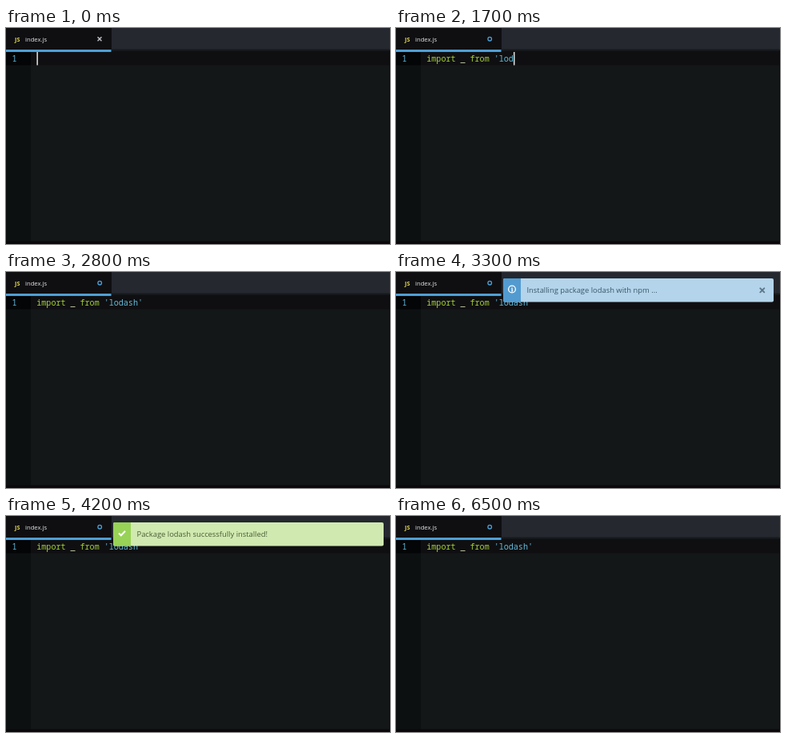
An HTML page for the animation above (6.6 s loop, 480 px wide and 270 px high).

```html
<!DOCTYPE html>
<html lang="en">
<head>
<meta charset="utf-8">
<title>Installing a package from the editor</title>
<style>
  html, body { margin: 0; width: 100%; height: 100%; overflow: hidden; background: #141718; }
  svg { display: block; width: 100vw; height: 100vh; }
  text { font-family: "Open Sans", "Noto Sans", "DejaVu Sans", sans-serif; white-space: pre; }
  .code { font: 500 10.05px "Noto Sans Mono", "DejaVu Sans Mono", monospace; }
  .line { fill: none; stroke-linecap: round; stroke-linejoin: round; }
  .note { transform-box: fill-box; transform-origin: 50% 50%; }
  .note text { font-size: 9.4px; }
  .item { font-size: 7.9px; }
</style>
</head>
<body>
<svg viewBox="0 0 480 270" preserveAspectRatio="none">
  <!-- editor -->
  <rect width="480" height="270" fill="#141718"/>
  <rect y="29" width="31" height="238" fill="#0d1011"/>
  <rect y="29" width="480" height="17.5" fill="#0f0f11"/>
  <rect y="29" width="31" height="17.5" fill="#040506"/>
  <rect y="266.5" width="480" height="3.5" fill="#0b080c"/>
  <rect x="479" y="28" width="1" height="242" fill="#08080a"/>
  <text class="code" x="7.6" y="42" fill="#62b9dc">1</text>
  <text class="code" id="code" x="38.3" y="42"></text>
  <rect id="caret" y="30" width="1.5" height="16.5" fill="#e4e4e4"/>

  <!-- tabs -->
  <rect width="480" height="27" fill="#25282f"/>
  <rect y="26.5" width="480" height="1.5" fill="#17191d"/>
  <rect width="132" height="27" fill="#0f0f12"/>
  <rect y="27" width="131.5" height="3" fill="#4f9fd3"/>
  <text x="11" y="17" font-size="7.2" font-weight="700" fill="#e5d84a">JS</text>
  <text x="24" y="16.5" font-size="7.7" fill="#e6e8ea">index.js</text>
  <path id="close" class="line" d="M115 11.7l4 4m0-4l-4 4" stroke="#b9bcc0" stroke-width="1.6"/>
  <circle id="dirty" cx="117.2" cy="13.7" r="2.3" fill="none" stroke="#4f9fd3" stroke-width="1.3"/>

  <!-- palette -->
  <g id="palette">
    <rect x="52.5" y="-4" width="374.5" height="101" fill="#1c1f20" stroke="#484c4e"/>
    <rect x="60.5" y="8" width="358.5" height="19" rx="1" fill="#595959" stroke="#0b0c0d"/>
    <rect x="65.3" y="9.5" width="1.5" height="16.5" fill="#eee"/>
    <rect x="60" y="36" width="360" height="26" fill="#529bd0"/>
    <rect x="60" y="63" width="360" height="26" fill="#272929"/>
    <g class="line" stroke="#fff" stroke-width="1.1">
      <path d="M68.5 45.8l5-1.6 5 1.6v6l-5 2-5-2zM68.5 45.8l5 1.8 5-1.8M73.5 47.6v6.2M71 45l5 1.8v2"/>
      <path d="M71.4 73l-3 3 3 3M74.6 73l3 3-3 3" stroke="#b4b6b7" stroke-width="1.4"/>
    </g>
    <text class="item" x="83" y="52" fill="#fff">lodash</text>
    <text class="item" x="83" y="79" fill="#8f9293">lodash → dev</text>
  </g>

  <!-- notifications -->
  <g id="info" class="note">
    <rect x="134" y="8" width="338" height="29.5" rx="2" fill="#b3d4ea"/>
    <path d="M156 8h-20a2 2 0 0 0-2 2v25.500a2 2 0 0 0 2 2h20z" fill="#529bd0"/>
    <circle cx="145" cy="21.500" r="4.400" fill="none" stroke="#fff" stroke-width="1.300"/>
    <path d="M144.200 20.900h1v3m-1 0h2M145 18.800v.7" fill="none" stroke="#fff" stroke-width="1.100"/>
    <text x="163.500" y="26.300" fill="#3a566b">Installing package lodash with npm ...</text>
    <path class="line" d="M455.300 20.300l5 5m0-5l-5 5" stroke="#5d7688" stroke-width="1.900"/>
  </g>
  <g id="done" class="note">
    <rect x="134" y="8" width="338" height="29.5" rx="2" fill="#d0e9b0"/>
    <path d="M156 8h-20a2 2 0 0 0-2 2v25.500a2 2 0 0 0 2 2h20z" fill="#98d256"/>
    <path d="M141 21.500l2.800 2.800 5.200-5.600" fill="none" stroke="#fff" stroke-width="2"/>
    <text x="163.500" y="26.300" fill="#4a5c36">Package lodash successfully installed!</text>
  </g>
</svg>
<script>
const LOOP = 6600, TYPE_START = 190, KEY_MS = 80, CHAR = 6.03;
const PALETTE = [2100, 2750];
const INFO = [2950, 3850], DONE = [3980, 6200];
const SHOW_MS = 160, HIDE_MS = 120;
const GREEN = '#a5d13c', BLUE = '#65bddb', PLAIN = '#dfe2e0';
const TOKENS = [['import', GREEN], [' _ ', '#cdd8ae'], ['from', GREEN], [" 'lodash'", BLUE]];
const LENGTH = TOKENS.reduce((sum, [word]) => sum + word.length, 0);

const el = id => document.getElementById(id);
const clamp = v => Math.max(0, Math.min(1, v));
const between = (t, [from, to]) => t >= from && t < to;
const show = (id, on) => { el(id).style.display = on ? '' : 'none'; };

const spans = TOKENS.map(() => {
  const span = document.createElementNS('http://www.w3.org/2000/svg', 'tspan');
  el('code').append(span);
  return span;
});

function drawCode(count) {
  let left = count;
  TOKENS.forEach(([word, color], i) => {
    const part = word.slice(0, Math.max(0, left));
    const unfinished = color === GREEN && part.length < word.length;
    spans[i].textContent = part;
    spans[i].setAttribute('fill', unfinished ? PLAIN : color);
    left -= word.length;
  });
}

// Drops in from above, then shrinks and fades away.
function drawNote(id, t, [from, to]) {
  const enter = 1 - (1 - clamp((t - from) / SHOW_MS)) ** 2;
  const leave = clamp((t - to) / HIDE_MS);
  const size = 1 - 0.2 * leave;
  show(id, t >= from && leave < 1);
  el(id).style.opacity = enter * (1 - leave);
  el(id).style.transform =
    `translateY(${-30 * (1 - enter)}px) scale(${size}, ${size * enter})`;
}

function draw(t) {
  const count = Math.max(0, Math.min(LENGTH, Math.floor((t - TYPE_START) / KEY_MS)));
  drawCode(count);
  el('caret').setAttribute('x', 38.4 + count * CHAR);
  show('caret', t < PALETTE[0]);
  show('close', count === 0);
  show('dirty', count > 0);
  show('palette', between(t, PALETTE));
  drawNote('info', t, INFO);
  drawNote('done', t, DONE);
}

const start = performance.now();
function tick() {
  draw((performance.now() - start) % LOOP);
  requestAnimationFrame(tick);
}
tick();
</script>
</body>
</html>
```
